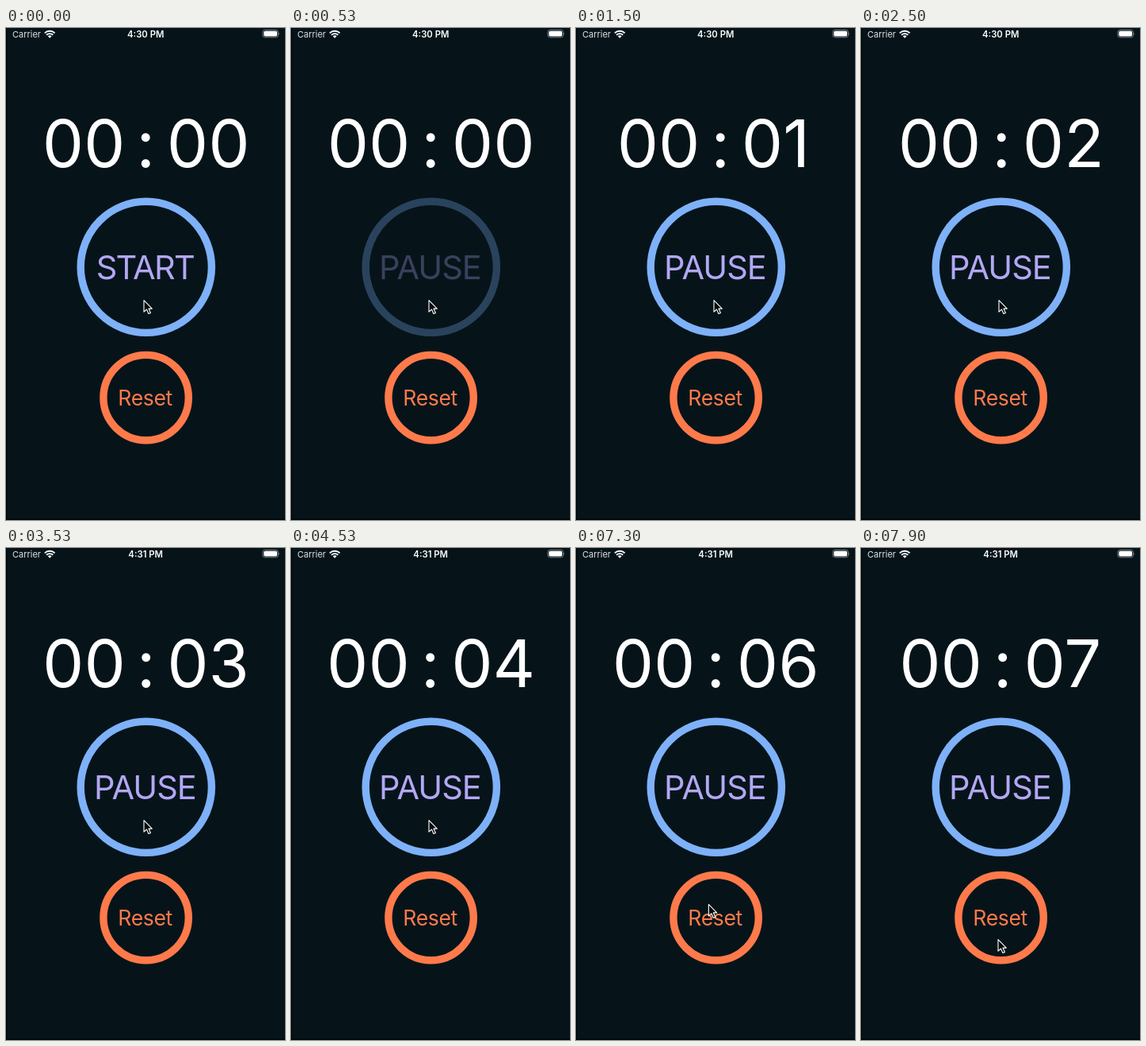
These frames come from a looping animation (352 by 619 pixels, 8000 ms). An HTML page:

```html
<!DOCTYPE html>
<html lang="en">
<head>
<meta charset="utf-8">
<title>Stopwatch</title>
<style>
  html, body { margin: 0; width: 100%; height: 100%; overflow: hidden; background: #06141a; }
  svg { display: block; width: 100%; height: 100%; }
  text { font-family: Inter, Roboto, sans-serif; white-space: pre; }
  .mid { text-anchor: middle; }
  .digits { font-size: 83px; fill: #fff; }
  .label { font-size: 41.5px; fill: #b3a7f4; }
  .reset { font-size: 26.6px; letter-spacing: -.4px; fill: #ff7a4b; }
  .carrier { font-size: 11px; fill: #dfe3e4; }
  .clock { font-size: 11.3px; font-weight: 600; fill: #fff; }
  .ring { fill: none; stroke-width: 9.4; }
</style>
</head>
<body>
<svg viewBox="0 0 352 619">
  <rect width="352" height="619" fill="#06141a"/>
  <path d="M0 0H1.2V617.4H352V619H0Z" fill="#010507"/>

  <text class="carrier" x="8" y="11.6">Carrier</text>
  <g fill="none" stroke="#fff" stroke-width="1.9">
    <path d="M48.8 6.4A9.2 9.2 0 0 1 61.6 6.4"/>
    <path d="M51.1 8.8A5.9 5.9 0 0 1 59.3 8.8"/>
  </g>
  <path d="M55.2 12.7L52.8 10.3A3.5 3.5 0 0 1 57.6 10.3Z" fill="#fff"/>
  <text id="clock" class="clock mid" x="176.2" y="11.6"></text>
  <rect x="323.9" y="2.4" width="19.6" height="9.4" rx="2.8" fill="none" stroke="#7f878a" stroke-width=".9"/>
  <rect x="325.3" y="3.8" width="16.8" height="6.6" rx="1.6" fill="#fff"/>
  <path d="M344.6 5.4Q346.2 7.1 344.6 8.8Z" fill="#7f878a"/>

  <g id="timer" class="digits">
    <text class="mid" x="98" y="175">00</text>
    <text class="mid" x="176.2" y="175">:</text>
    <text id="seconds" x="202.8" y="175"></text>
  </g>

  <g id="toggle">
    <circle class="ring" cx="176.8" cy="300.8" r="82.6" stroke="#7eb1f8"/>
    <text id="label" class="label mid" x="175.4" y="316"></text>
  </g>

  <circle class="ring" cx="176.6" cy="465.1" r="53.7" stroke="#ff7a4b"/>
  <text class="reset mid" x="175.6" y="475">Reset</text>

  <path id="cursor" d="M0 .6V15.2L3.5 12 5.9 17.5 8.4 16.4 6 11.1H10.3Z"
        fill="#05090b" stroke="#fff" stroke-width="1.1" stroke-linejoin="round"/>
</svg>
<script>
  const LOOP = 8000;
  const TICKS = [1500, 2500, 3530, 4530, 5560, 6560, 7560];
  // The centred readout moves as the last digit's width changes.
  const SHIFT = [0, 6, 1, .4, -.6, .3, 0, 2.6];
  const PRESS = 260, RELEASE = 460, LIT = 730, MINUTE = 3360;
  const PATH = [
    { at: 6830, end: 7600, from: [174, 342], to: [164.5, 493.5] },
    { at: 7760, end: 7900, from: [164.5, 493.5], to: [173, 492] }
  ];

  const $ = id => document.getElementById(id);
  const clamp = v => Math.min(1, Math.max(0, v));
  const ease = p => p < .5 ? 2 * p * p : 1 - 2 * (1 - p) ** 2;

  function setText(id, value) {
    if ($(id).textContent !== value) $(id).textContent = value;
  }

  function toggleAlpha(t) {
    if (t < PRESS) return 1;
    const p = clamp((t - RELEASE) / (LIT - RELEASE));
    return .2 + .8 * ease(Math.floor(p * 8) / 8);
  }

  function cursorAt(t) {
    const leg = t < PATH[1].at ? PATH[0] : PATH[1];
    const p = ease(clamp((t - leg.at) / (leg.end - leg.at)));
    return leg.from.map((v, i) => v + (leg.to[i] - v) * p);
  }

  function draw(t) {
    const n = TICKS.filter(tick => t >= tick).length;
    setText('seconds', '0' + n);
    $('timer').setAttribute('transform', `translate(${SHIFT[n]} 0)`);
    setText('clock', t < MINUTE ? '4:30 PM' : '4:31 PM');

    const running = t >= RELEASE;
    setText('label', running ? 'PAUSE' : 'START');
    $('label').style.letterSpacing = running ? '-1px' : '-1.7px';
    $('toggle').setAttribute('opacity', toggleAlpha(t));
    $('cursor').setAttribute('transform', `translate(${cursorAt(t)})`);
  }

  const start = performance.now();
  function frame() {
    draw((performance.now() - start) % LOOP);
    requestAnimationFrame(frame);
  }
  frame();
</script>
</body>
</html>
```
